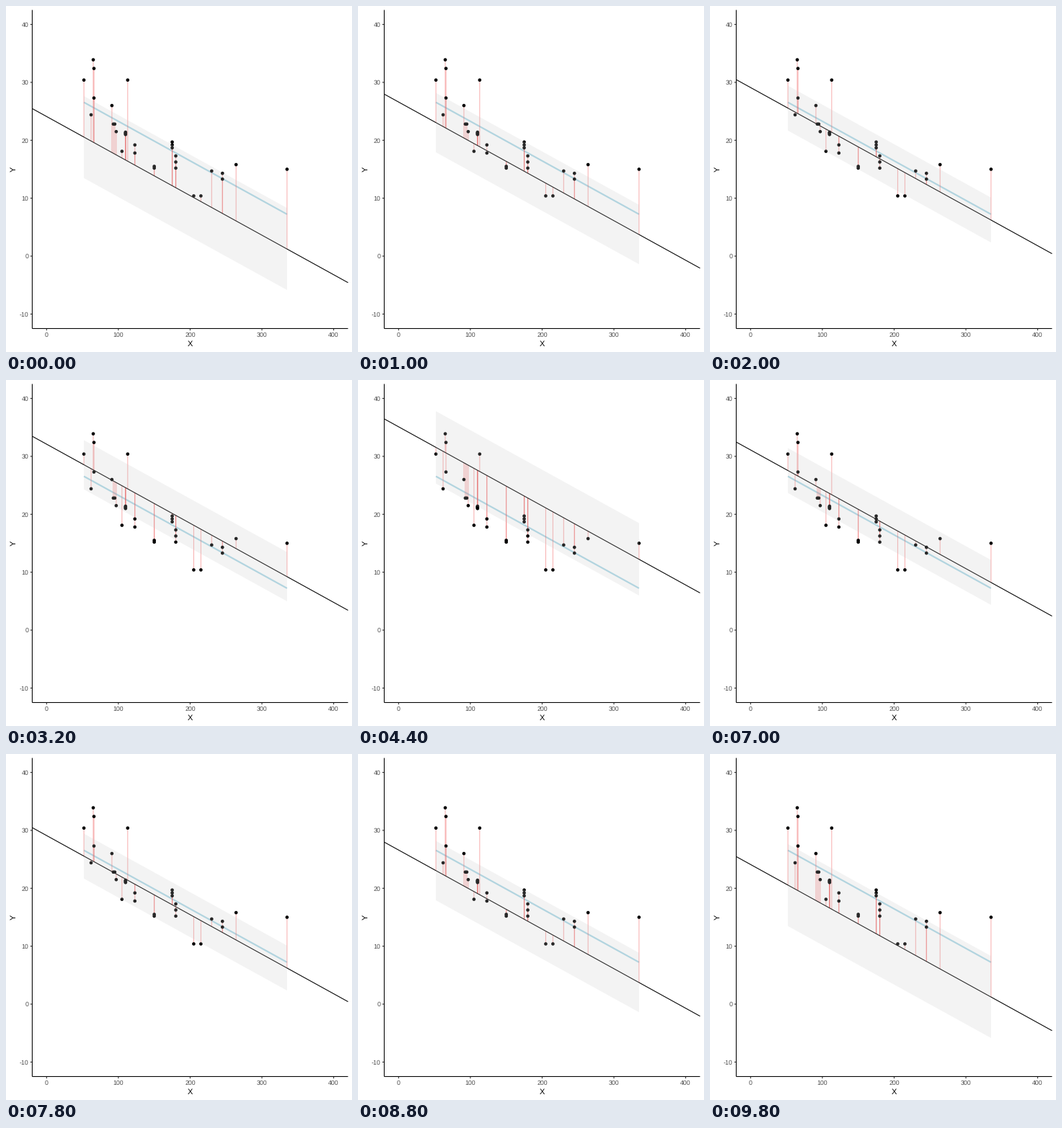
Recreate the animation shown at these times as a matplotlib script. Size 480 px wide and 480 px high, loop 10 s.

```python
import matplotlib.pyplot as plt
import numpy as np
from matplotlib.animation import FuncAnimation
from matplotlib.patches import Circle, Polygon

plt.rcParams["font.family"] = "Liberation Sans"
plt.rcParams["text.hinting"] = "none"
plt.rcParams["path.snap"] = False

SIZE = 480
LEFT, RIGHT, TOP, BOTTOM = 36.4, 474.5, 5.5, 447.45
X_RANGE = (-20, 420)
Y_RANGE = (-12.5, 42.5)
THIN = 1.07
STEPS = 25


def column(x, low, high, count=2):
    """Evenly spaced points, one above the other."""
    return [(x, y) for y in np.linspace(low, high, count)]


def row(y, *at):
    return [(x, y) for x in at]


points = np.array([
    *row(30.4, 52, 113), *row(22.8, 93, 95), *row(10.4, 205, 215),
    *column(66, 27.3, 32.4), *column(110, 21, 21.4, 4),
    *column(123, 17.8, 19.2), *column(150, 15.2, 15.5),
    *column(175, 18.7, 19.7, 3), *column(180, 15.2, 17.3, 3),
    *column(245, 13.3, 14.3),
    (62, 24.4), (65, 33.9), (91, 26), (97, 21.5),
    (105, 18.1), (230, 14.7), (264, 15.8), (335, 15),
])
xs, ys = points.T
slope, intercept = np.polyfit(xs, ys, 1)
ends = np.array([xs.min(), xs.max()])


def px(x):
    return LEFT + (np.asarray(x) - X_RANGE[0]) / np.ptp(X_RANGE) * (RIGHT - LEFT)


def py(y):
    return BOTTOM - (np.asarray(y) - Y_RANGE[0]) / np.ptp(Y_RANGE) * (BOTTOM - TOP)


def line(x, y, **style):
    style = {"color": "black", "lw": THIN, "solid_capstyle": "butt", **style}
    return ax.plot(x, y, **style)[0]


def label(x, y, text, size=8.8, color="#4d4d4d", ha="center", rotation=0):
    ax.text(x, y, text, size=size, color=color, ha=ha, va="baseline",
            rotation=rotation, rotation_mode="anchor")


fig = plt.figure(figsize=(SIZE / 72, SIZE / 72), dpi=72, facecolor="white")
ax = fig.add_axes([0, 0, 1, 1])
ax.set_xlim(0, SIZE)
ax.set_ylim(SIZE, 0)
ax.set_autoscale_on(False)
ax.axis("off")

# Axes, ticks and titles
line([LEFT, LEFT], [TOP, BOTTOM], zorder=7)
line([LEFT, RIGHT], [BOTTOM, BOTTOM], zorder=7)
for v in range(0, 401, 100):
    line([px(v)] * 2, [BOTTOM, BOTTOM + 2.74], color="#333333")
    label(px(v), 458.8, str(v))
for v in range(-10, 41, 10):
    line([LEFT - 2.74, LEFT], [py(v)] * 2, color="#333333")
    label(31.5, py(v) + 3.15, str(v), ha="right")
label((LEFT + RIGHT) / 2, 472.1, "X", 11, "black")
label(13.4, (TOP + BOTTOM) / 2, "Y", 11, "black", rotation=90)

# Data, best fit and the moving layers
line(px(ends), py(intercept + slope * ends), color="lightblue", lw=2.13, zorder=2)
residuals = [line([px(x)] * 2, [py(y)] * 2, color="#f04848", alpha=0.42, zorder=3)
             for x, y in points]
trial = line(px(X_RANGE), py([0, 0]), zorder=4)
# Circles keep subpixel positions, which plot markers would round
for x, y in points:
    ax.add_patch(Circle((px(x), py(y)), 2.31, color="black", lw=0, zorder=5))
band = Polygon(np.zeros((4, 2)), facecolor="#c4c4c4", alpha=0.2, lw=0, zorder=6)
ax.add_patch(band)


def draw(i):
    step = min(i, 2 * STEPS - 1 - i)
    base = intercept - 6 + 0.5 * step

    def fit(x):
        return base + slope * np.asarray(x)

    trial.set_ydata(py(fit(X_RANGE)))
    for seg, (x, y) in zip(residuals, points):
        seg.set_ydata(py([y, fit(x)]))

    rmse = np.sqrt(np.mean((ys - fit(xs)) ** 2))
    edge_x = np.r_[ends, ends[::-1]]
    edge_y = fit(edge_x) + rmse * np.array([1, 1, -1, -1])
    band.set_xy(np.column_stack([px(edge_x), py(edge_y)]))
    return [*residuals, trial, band]


anim = FuncAnimation(fig, draw, frames=2 * STEPS, interval=200,
                     repeat=True, repeat_delay=0)
plt.show()
```
